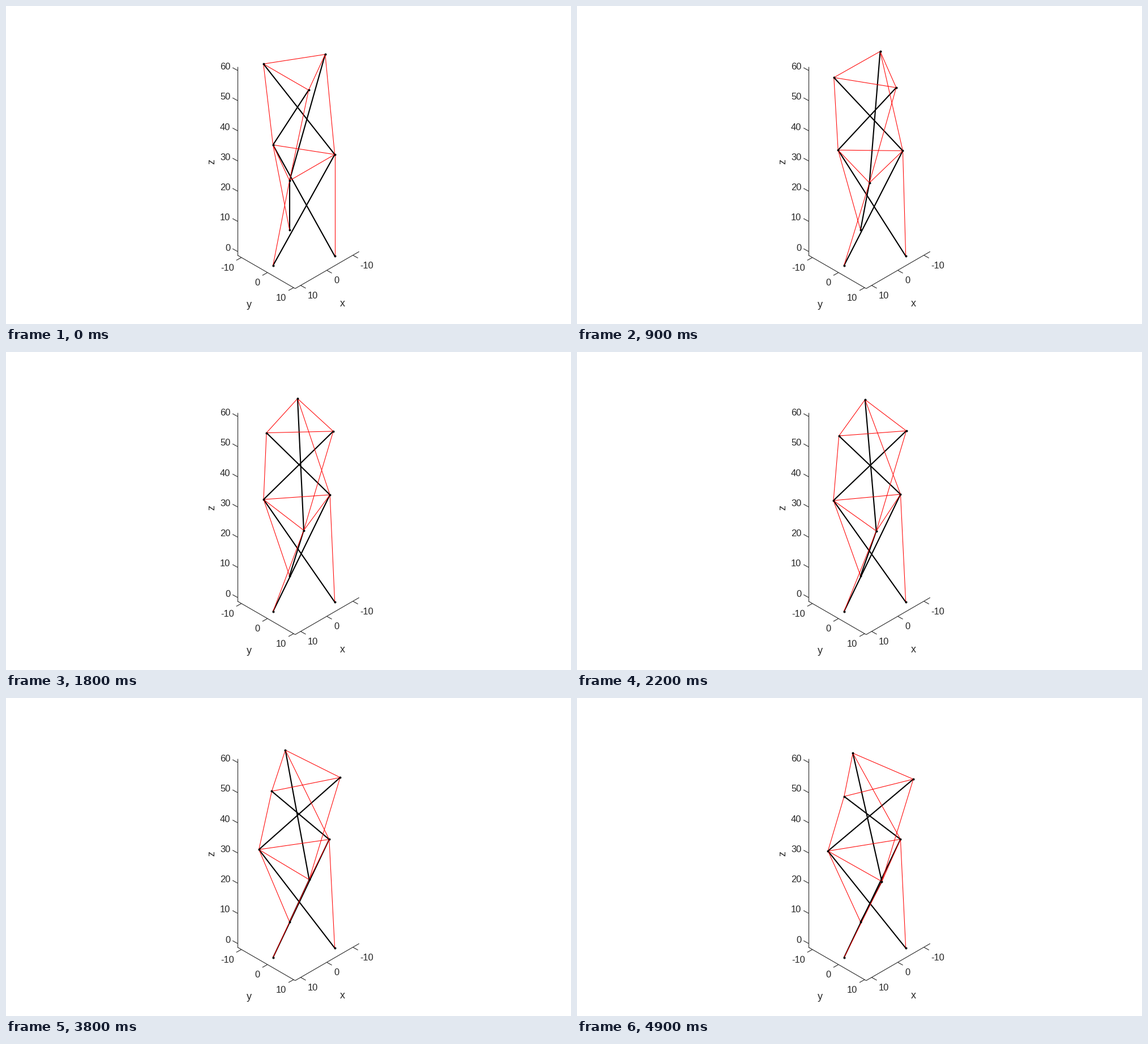
Recreate the animation shown at these times as a matplotlib script. Size 998 by 561 pixels, loop 5 s.

```python
import numpy as np
import matplotlib.pyplot as plt
from matplotlib.animation import FuncAnimation

W, H = 998, 561
FRAMES, INTERVAL = 50, 100
INK = "#262626"

# Isometric view: pixels per unit, and the pixel of the point (0, 0, 0).
UNIT = 6.52
ORIGIN = np.array([517.2, 430.9])
XLIM, YLIM, ZLIM = (-12.4, 12.1), (-11.5, 10.6), (-1.25, 61.2)

# Two stacked three-bar prisms, each twisted by 30 degrees at rest.
RADIUS, STAGE, REST_TWIST = 10, 30, 30
BAR_SQ = STAGE**2 + 2 * RADIUS**2 * (1 + np.cos(np.radians(30)))

plt.rcParams["font.family"] = "Liberation Sans"
# At 72 dpi one point is one pixel.
fig = plt.figure(figsize=((W + .01) / 72, (H + .01) / 72), dpi=72, facecolor="white")
ax = fig.add_axes([0, 0, 1, 1])
ax.set(xlim=(-.5, W - .5), ylim=(H - .5, -.5))
ax.axis("off")


def project(x, y, z):
    across = (y - x) / np.sqrt(2)
    down = (x + y) / np.sqrt(6) - z * np.sqrt(2 / 3)
    return ORIGIN + UNIT * np.array([across, down])


def line(p, q, color, width, z=1):
    return ax.plot([p[0], q[0]], [p[1], q[1]], color=color, lw=width,
                   solid_capstyle="butt", zorder=z)[0]


def label(pos, text, size=16.5, ha="center", **kw):
    ax.text(*pos, text, size=size, color=INK, ha=ha, va="center", **kw)


def tick(pos, step, text, offset, ha):
    line(pos, pos + step, INK, 1.1)
    label(pos + offset, text, ha=ha)


def draw_axes():
    (x0, x1), (y0, y1), (z0, z1) = XLIM, YLIM, ZLIM
    path = [project(*p) for p in ((x1, y0, z1), (x1, y0, z0), (x1, y1, z0), (x0, y1, z0))]
    for p, q in zip(path, path[1:]):
        line(p, q, INK, 1.1)
    for v in (-10, 0, 10):
        tick(project(v, y1, z0), (9, 5), str(v), (12.5, 18.5), "left")
        tick(project(x1, v, z0), (-9, 5), str(v), (-13.3, 18.5), "right")
    for v in range(0, 61, 10):
        tick(project(x1, y0, v), (-8.7, -4.8), str(v), (-12.6, -6), "right")
    label((593.8, 524.5), "x", 18)
    label((428.6, 526.5), "y", 18)
    label((363.7, 273.5), "z", 18, rotation=90)


def stage_height(r_low, r_high, twist):
    """Height at which the rigid bars fit between two rings."""
    gap = np.radians(REST_TWIST - twist)
    return np.sqrt(BAR_SQ - r_low**2 - r_high**2 - 2 * r_low * r_high * np.cos(gap))


def ring(radius, degrees, z):
    angles = np.radians(degrees + 120 * np.arange(3))
    return [project(radius * np.cos(a), radius * np.sin(a), z) for a in angles]


def joints(frame):
    """Rings of the tower as it is pressed down at a steady speed."""
    twist1 = 23.5 * np.arctan(frame / 13.3)
    twist2 = 30 * np.arctan(frame / 16)
    radii = np.linspace(9.5, 12.5, 300)
    heights = stage_height(RADIUS, radii, twist1) + stage_height(radii, radii, twist2)
    top = 2 * STAGE - .1 * frame
    r = np.interp(-top, -heights, radii)
    middle = stage_height(RADIUS, r, twist1)
    return (ring(RADIUS, 0, 0)
            + ring(r, REST_TWIST + twist1, middle)
            + ring(r, 2 * REST_TWIST + twist1 + twist2, top))


# Joint 3 * level + k is corner k of a ring.
bars, cables = [], []
for low in (0, 3):
    high = low + 3
    for k in range(3):
        following = high + (k + 1) % 3
        bars.append((low + k, following))
        cables += [(low + k, high + k), (high + k, following)]

draw_axes()
start = joints(0)
members = [(a, b, line(start[a], start[b], *style))
           for pairs, style in ((bars, ("black", 2.1, 2)), (cables, ("red", 1.05, 3)))
           for a, b in pairs]
dots, = ax.plot([], [], "o", color="black", ms=4, mew=0, zorder=4)


def update(frame):
    pos = joints(frame)
    for a, b, member in members:
        member.set_data(*zip(pos[a], pos[b]))
    dots.set_data(*zip(*pos))
    return [member for _, _, member in members] + [dots]


anim = FuncAnimation(fig, update, frames=FRAMES, interval=INTERVAL,
                     repeat=True, repeat_delay=0)
plt.show()
```
